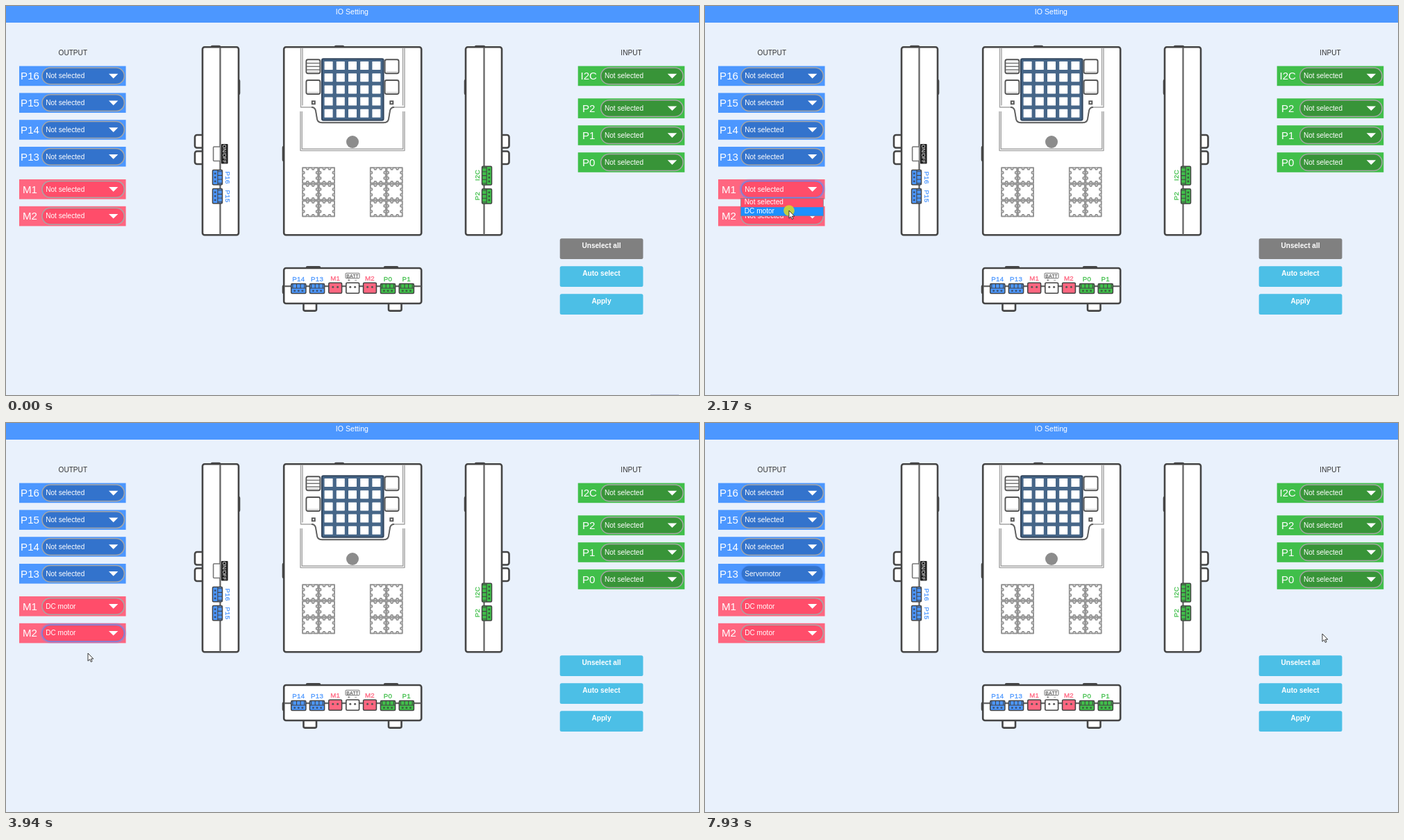
An HTML page for the animation above (8000 ms loop, 998 px wide and 561 px high).

```html
<!DOCTYPE html>
<html lang="en">
<head>
<meta charset="utf-8">
<title>IO Setting</title>
<style>
html, body { margin: 0; width: 100%; height: 100%; overflow: hidden; background: #e9f1fc; }
svg { display: block; width: 100%; height: 100%; font: 10.1px "Liberation Sans", Arial, sans-serif; }
.mid { text-anchor: middle; }
.line { fill: #fff; stroke: #454545; stroke-width: 2.6; stroke-linejoin: round; }
.thin { fill: none; stroke: #a2a2a2; stroke-width: 1.4; stroke-linejoin: round; }
.seam { fill: none; stroke: #666; stroke-width: 2.3; }
.key { fill: #fff; stroke: #555; stroke-width: 1.9; }
.tag { font-size: 9.7px; letter-spacing: .3px; text-anchor: middle; stroke-width: .3; }
.pill { stroke: #a6a6a6; stroke-width: 1.5; }
.pill.hot { stroke: rgba(77, 144, 254, .78); }
.glow { fill: none; stroke: rgba(77, 144, 254, .22); stroke-width: 3; display: none; }
</style>
</head>
<body>
<svg id="stage" viewBox="0 0 998 561"></svg>
<script>
const BLUE = '#4c97ff', PINK = '#ff6680', GREEN = '#40bf4a';
const DARK = { [BLUE]: '#3373cc', [PINK]: '#ff4d6a', [GREEN]: '#389438' };
const LOOP = 8000;

const rect = (x, y, w, h, attrs = '', r = 0) =>
  `<rect x="${x}" y="${y}" width="${w}" height="${h}" rx="${r}" ${attrs}/>`;
const path = (d, attrs) => `<path d="${d}" ${attrs}/>`;
const text = (x, y, s, attrs = '') => `<text x="${x}" y="${y}" ${attrs}>${s}</text>`;
const move = (x, y, body, turn = 0) =>
  `<g transform="translate(${x} ${y}) rotate(${turn})">${body}</g>`;
const range = n => [...Array(n).keys()];
const line = 'class="line"', thin = 'class="thin"', seam = 'class="seam"', key = 'class="key"';

// ---- port rows ----
const LEFT = 19, RIGHT = 823.7;
const rows = [
  ['P16', LEFT, 86.6, BLUE], ['P15', LEFT, 125.4, BLUE], ['P14', LEFT, 164.2, BLUE], ['P13', LEFT, 203, BLUE],
  ['M1', LEFT, 250, PINK], ['M2', LEFT, 288.8, PINK],
  ['I2C', RIGHT, 86.6, GREEN], ['P2', RIGHT, 133.3, GREEN], ['P1', RIGHT, 172.2, GREEN], ['P0', RIGHT, 211.2, GREEN]
];

function row([name, x, y, color]) {
  return `<g id="${name}">` + rect(x, y, 153.6, 28.6, `fill="${color}"`) +
    text(x + 15.5, y + 19.6, name, 'class="mid" fill="#fff" font-size="15.1"') +
    rect(x + 31.5, y + 1, 121.5, 26.6, 'class="glow"', 13.3) +
    rect(x + 33, y + 2.4, 118.4, 23.8, `class="pill" fill="${DARK[color]}"`, 11.9) +
    text(x + 38.2, y + 17.5, 'Not selected', 'class="value" fill="#fff"') +
    path(`M${x + 129} ${y + 11.1}h13.4l-6.7 6.7z`, 'fill="#fff"') + '</g>';
}

const lists = {
  M1: ['Not selected', 'DC motor'],
  M2: ['Not selected', 'DC motor'],
  P13: ['Not selected', 'Servomotor', 'LED', 'Buzzer']
};
const STEP = 12.7;

function menu(name) {
  const [, x, y, color] = rows.find(r => r[0] === name), items = lists[name];
  const body = rect(0, 0, 118.8, items.length * STEP, `fill="${DARK[color]}"`) +
    rect(0, 0, 118.8, STEP, 'class="mark" fill="#1e90ff"') +
    items.map((s, i) => text(5.2, i * STEP + 9.1, s, 'fill="#fff"')).join('') +
    rect(0, 0, 118.8, items.length * STEP, 'fill="none" stroke="#7d7d8c" stroke-width=".7"');
  return `<g id="menu-${name}" style="display:none">${move(x + 32.6, y + 27.4, body)}</g>`;
}

// ---- device parts ----
function pins(n, color) {
  const w = n * 5.6 + 4.4;
  return rect(0, 0, w, 14, `fill="${color}" stroke="#444" stroke-width="1.5"`, 1.5) +
    path(`M0 6.6H${w}` + range(n + 1).map(i => `M${2.2 + i * 5.6} .5v5.6`).join(''),
      'fill="none" stroke="#444" stroke-width="1.1"') +
    range(n).map(i => rect(3.6 + i * 5.6, 9, 2.8, 2.6, 'fill="#333" opacity=".7"', .8)).join('');
}

function plug(x, color) {
  return rect(x, 399.3, 18.8, 15, `fill="${color}" stroke="#444" stroke-width="1.6"`, 1.5) +
    [6, 12.8].map(d => `<circle cx="${x + d}" cy="405.3" r="1.5" fill="#555"/>`).join('');
}

const tag = (x, y, s, color, turn = 0) =>
  move(x, y, text(0, 3.5, s, `class="tag" fill="${color}" stroke="${color}"`), turn);

function block(x, y) {
  const side = path('M-11-11h5l1 2.5h2l1-2.5h4l1 2.5h2l1-2.5h5', 'fill="none" stroke="#929292" stroke-width="1.7"');
  return move(x, y, rect(-11.2, -11.2, 22.4, 22.4, 'fill="#fff" stroke="#929292" stroke-width="1.4"') +
    range(4).map(i => move(0, 0, side, i * 90)).join(''));
}

function leftView() {
  return rect(272, 186, 14, 18.5, line, 3) + rect(272, 209.5, 14, 18.5, line, 3) +
    rect(296, 58, 12, 4, line, 1) + rect(331, 107, 5, 20, line, 1) +
    rect(283, 59.3, 52, 271, line, 3) +
    path('M308.5 60V330', seam) +
    rect(298.6, 203, 10, 20.5, 'fill="#fff" stroke="#777" stroke-width="1.6"', 1) +
    rect(310, 199, 9.6, 28.6, 'fill="#222"', 1) +
    move(314.8, 213.3, text(0, 2.7, 'ON/OFF', 'class="mid" fill="#fff" font-size="7.2"'), 90) +
    move(311.5, 236.6, pins(3, BLUE), 90) + move(311.5, 263.6, pins(3, BLUE), 90) +
    tag(319, 247.5, 'P16', BLUE, 90) + tag(319, 274.3, 'P15', BLUE, 90);
}

function rightView() {
  return rect(711, 186, 13.5, 18.5, line, 3) + rect(711, 209.5, 13.5, 18.5, line, 3) +
    rect(676, 58, 13, 4, line, 1) + rect(661, 107, 5, 20, line, 1) +
    rect(662, 59.3, 52, 271, line, 3) +
    path('M688.5 60V330', seam) +
    move(685.5, 258, pins(4, GREEN), -90) + move(685.5, 285, pins(3, GREEN), -90) +
    tag(678, 244, 'I2C', GREEN, -90) + tag(678, 274, 'P2', GREEN, -90);
}

function frontView() {
  const cells = range(25).map(i =>
    rect(458.6 + i % 5 * 17.2, 80 + (i / 5 | 0) * 17.2, 12, 12, 'fill="#fff"', .6)).join('');
  const keys = [[432.4, 77.3], [545.6, 77.3], [432.4, 107], [545.6, 107]].map(([x, y]) =>
    rect(x, y, 20, 20, key, 2.5) + path(`M${x + 2} ${y + 17.6}h16`, 'stroke="#bbb"')).join('');
  const blocks = range(12).map(i => {
    const c = i % 4;
    return block(438.2 + c % 2 * 23.8 + (c > 1 ? 97.6 : 0), 244.3 + (i / 4 | 0) * 24);
  }).join('');
  const lip = 'Q445 146 446 151L448 163Q449 168.2 455 168.2H544Q550 168.2 551 163L553 151Q554 146 559 146';
  return rect(474, 58, 12, 4, line, 1) + rect(399, 203, 5, 20, line, 1) +
    rect(400.2, 59.3, 198, 271, line, 3) +
    path(`M424.5 60.5V146H440${lip}H574V60.5M427 60.5V143.5M571.5 60.5V143.5`, thin) +
    path('M440 146' + lip, 'fill="none" stroke="#606060" stroke-width="1.9"') +
    path('M424 152V208.6H574V152M426.3 152V206.2H571.7V152', thin) +
    rect(455, 76.2, 88.6, 88.6, 'fill="#466688" stroke="#33475f" stroke-width="2"', 2) + cells + keys +
    path('M433 82.5h19M433 87.3h19M433 92h19', 'stroke="#777" stroke-width="1.6"') +
    rect(440.8, 137.3, 4, 4, key) + rect(553.3, 137.3, 4, 4, key) +
    '<circle cx="499" cy="196" r="9" fill="#8c8c8c"/>' + blocks;
}

function bottomView() {
  const ports = [[421.3, BLUE, 'P14'], [448, BLUE, 'P13'], [550, GREEN, 'P0'], [576.8, GREEN, 'P1']];
  return rect(428.5, 425, 18.5, 14.6, line, 2) + rect(551, 425, 18.5, 14.6, line, 2) +
    rect(433, 376.4, 19, 4, line, 1) + rect(545, 376.4, 19, 4, line, 1) + rect(399, 403.5, 4, 10.5, line, 1) +
    rect(400.2, 378, 198, 51, line, 3) +
    path('M401 404.2H597.5', seam) +
    ports.map(([x, color, s]) => move(x - 10.6, 400.4, pins(3, color)) + tag(x, 393, s, color)).join('') +
    plug(464.8, PINK) + plug(489.8, '#fff') + plug(514.6, PINK) +
    tag(474.2, 392, 'M1', PINK) + tag(524, 392, 'M2', PINK) +
    rect(489, 385.3, 20, 7.4, 'fill="#fff" stroke="#666" stroke-width=".9"', 1) +
    text(499, 391.6, 'BATT', 'class="mid" font-size="7" fill="#333"') +
    text(494, 398, '+', 'class="mid" font-size="6.5" fill="#333"') +
    text(504, 398, '−', 'class="mid" font-size="6.5" fill="#333"');
}

function button(y, label, id) {
  return rect(797.7, y, 119.8, 29.7, `id="${id}" fill="#4cbfe6"`, 2.5) +
    text(857.5, y + 14.1, label, 'class="mid" fill="#fff" font-weight="bold"');
}

const stage = document.getElementById('stage');
stage.innerHTML = rect(0, 0, 998, 24, `fill="${BLUE}"`) +
  text(498.4, 12, 'IO Setting', 'class="mid" fill="#fff" font-size="10.6"') +
  text(96.3, 71, 'OUTPUT', 'class="mid" fill="#333"') +
  text(900.5, 71, 'INPUT', 'class="mid" fill="#333"') +
  leftView() + frontView() + rightView() + bottomView() + rows.map(row).join('') +
  button(335.3, 'Unselect all', 'clear') + button(375.3, 'Auto select', 'auto') + button(415.2, 'Apply', 'apply') +
  rect(928, 560, 41, 1, 'id="edge" fill="#c2c8df"') +
  Object.keys(lists).map(menu).join('') +
  '<circle id="press" r="7.8" fill="#d8d72a" opacity=".88"/>' +
  path('M0 0V11.2L2.6 8.8 4.3 12.5 6.1 11.7 4.4 8.1H7.8Z', 'id="cursor" fill="#fff" stroke="#222" stroke-width=".9"');

// ---- timeline ----
// start, end, steps, target x, target y
const moves = [
  [160, 930, 11, 157, 262], [1540, 1540, 1, 130, 277], [1650, 1870, 3, 121, 295],
  [2180, 2410, 4, 151, 305], [2560, 2710, 3, 161, 305], [2860, 2860, 1, 158, 304],
  [3180, 3490, 5, 118, 332], [4340, 4750, 6, 148, 212], [4900, 4900, 1, 149, 212],
  [6210, 6440, 4, 128, 252], [6520, 6520, 1, 127, 252],
  [7490, 7780, 5, 760, 321], [7860, 7930, 2, 889, 304]
];
const presses = [[1100, 1260], [2100, 2180], [2960, 3030], [3800, 3870], [5430, 5530], [6840, 6910]];
// focus from, focus to, open, chosen, index
const uses = {
  M1: [1100, 2960, 1180, 2180, 1],
  M2: [2960, 5430, 2960, 3870, 1],
  P13: [5430, LOOP, 5430, 6910, 1]
};

const el = id => document.getElementById(id);
const show = (node, on) => { node.style.display = on ? 'inline' : 'none'; };
const within = (t, a, b) => t >= a && t < b;

function pointer(t) {
  let x = 662, y = 549;
  for (const [a, b, n, tx, ty] of moves) {
    if (t < a) break;
    const k = n < 2 ? 1 : Math.min(n, 1 + Math.floor((t - a) / (b - a) * (n - 1) + 1e-6));
    x += (tx - x) * k / n;
    y += (ty - y) * k / n;
  }
  return [x, y];
}

function draw(t) {
  const [x, y] = pointer(t);
  const place = `translate(${x} ${y})`;
  el('cursor').setAttribute('transform', place);
  el('press').setAttribute('transform', place);
  show(el('cursor'), t >= 160);
  show(el('press'), presses.some(([a, b]) => within(t, a, b)));
  show(el('edge'), t < 1100);
  el('clear').setAttribute('fill', t < uses.M1[3] ? '#808080' : '#4cbfe6');

  let open = false;
  for (const name in uses) {
    const [, , from, to, pick] = uses[name];
    const on = within(t, from, to), box = el('menu-' + name);
    const top = rows.find(r => r[0] === name)[2] + 27.4;
    const at = Math.max(0, Math.floor((y - top) / STEP));
    open = open || on;
    show(box, on);
    box.querySelector('.mark').setAttribute('y', Math.min(at, pick) * STEP);
    el(name).querySelector('.value').textContent = lists[name][t < to ? 0 : pick];
  }
  for (const [name, rx, ry] of rows) {
    const use = uses[name], focus = !!use && within(t, use[0], use[1]);
    const hover = !open && t >= 160 && within(x, rx + 32, rx + 152) && within(y, ry + 2, ry + 27);
    el(name).querySelector('.pill').classList.toggle('hot', focus || hover);
    show(el(name).querySelector('.glow'), focus);
  }
}

const start = performance.now();
function tick() {
  draw((performance.now() - start) % LOOP);
  requestAnimationFrame(tick);
}
draw(0);
requestAnimationFrame(tick);
</script>
</body>
</html>
```
